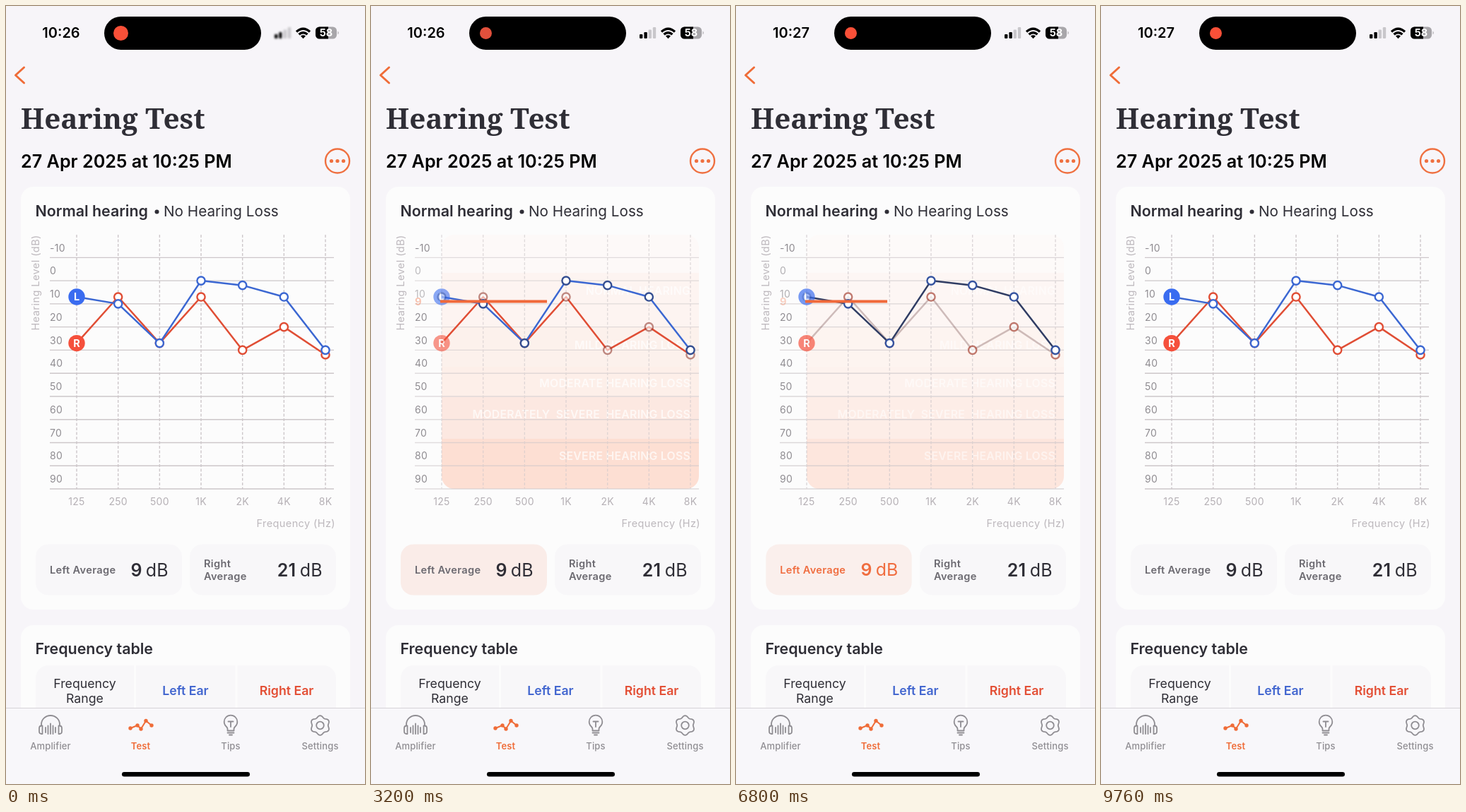
Recreate the animation shown at these times as an HTML page. Size 508 by 1102 pixels, loop 9840 ms.

```html
<!DOCTYPE html>
<html lang="en">
<head>
<meta charset="utf-8">
<title>Hearing Test</title>
<style>
html, body { margin: 0; width: 100%; height: 100%; overflow: hidden; background: #f7f5f9; }
svg { display: block; width: 100%; height: 100%; }
text { font-family: Inter, "Noto Sans", sans-serif; white-space: pre; }
.b { font-weight: 600; }
.m { text-anchor: middle; }
.e { text-anchor: end; }
.axis { font-size: 14px; letter-spacing: .3px; fill: #8f8c91; }
.soft { fill: #bdb8bd; }
.name { font-size: 14.6px; font-weight: 600; letter-spacing: .35px; }
.val { font-size: 25px; }
.tab { font-size: 13px; font-weight: 500; letter-spacing: .15px; fill: #8f8d92; text-anchor: middle; }
.icon { fill: none; stroke: #8f8d92; stroke-width: 1.8; stroke-linecap: round; stroke-linejoin: round; }
</style>
</head>
<body>
<svg id="stage" viewBox="0 0 508 1102">
  <defs>
    <clipPath id="plot"><rect x="100" y="324" width="364" height="360" rx="18"/></clipPath>
    <filter id="haze" x="-30%" y="-30%" width="160%" height="160%"><feGaussianBlur id="blur" stdDeviation="0"/></filter>
  </defs>
  <rect width="508" height="1102" fill="#f7f5f9"/>

  <text id="clock" class="b m" x="78" y="45" font-size="20">10:26</text>
  <rect x="139" y="15" width="222" height="47" rx="23.5"/>
  <circle id="rec" cx="162.5" cy="38.5" r="8.5"/>
  <g id="signal">
    <rect x="380" y="40" width="4.4" height="6" rx="1.2"/>
    <rect x="386.4" y="37" width="4.4" height="9" rx="1.2"/>
    <rect x="392.6" y="33.5" width="4.4" height="12.5" rx="1.2" fill="#c9c7cb"/>
    <rect x="398.8" y="30" width="4.4" height="16" rx="1.2" fill="#c9c7cb"/>
  </g>
  <g fill="none" stroke="#000" stroke-width="3.4">
    <path d="M411 36.5Q420.500 28 430 36.500"/>
    <path d="M414.500 40.300Q420.500 35 426.500 40.300"/>
  </g>
  <path d="M420.500 46.200L417 42.600Q420.500 40 424 42.600Z"/>
  <rect x="438" y="29.500" width="30" height="17" rx="5.500" fill="#a8a6aa"/>
  <path d="M456 29.500H443.500A5.500 5.500 0 0 0 438 35V41A5.500 5.500 0 0 0 443.500 46.500H456Z"/>
  <path d="M469.500 35.500Q472 38 469.500 40.500Z" fill="#a8a6aa"/>
  <text class="m" x="453" y="43.200" font-size="14.500" font-weight="700" fill="#fff">58</text>

  <path d="M25.500 87L13.500 98L25.500 109" fill="none" stroke="#ef6c38" stroke-width="3" stroke-linecap="round" stroke-linejoin="round"/>
  <text x="21" y="173.500" style="font-family:'Noto Serif',serif" font-size="40.500" font-weight="600" fill="#2f2e36">Hearing Test</text>
  <text class="b" x="21" y="228.500" font-size="25.200">27 Apr 2025 at 10:25 PM</text>
  <circle cx="469" cy="219.500" r="17" fill="none" stroke="#ef7040" stroke-width="2.400"/>
  <g fill="#ef7040"><circle cx="460.500" cy="219.500" r="2.600"/><circle cx="469" cy="219.500" r="2.600"/><circle cx="477.500" cy="219.500" r="2.600"/></g>

  <rect x="21" y="256" width="466" height="599" rx="18" fill="#fcfcfc"/>
  <g fill="#2f2e36">
    <text class="b" x="41.500" y="297.500" font-size="21.400">Normal hearing</text>
    <circle cx="213.500" cy="291.500" r="3"/>
    <text x="223" y="297.500" font-size="20.700">No Hearing Loss</text>
  </g>
  <g id="bands" clip-path="url(#plot)"></g>
  <g id="bandText"></g>
  <g id="grid" stroke="#cdc7ca" stroke-width="1.400"></g>
  <g id="labels"></g>
  <text class="soft" transform="translate(47 459.500) rotate(-90)" font-size="14.500" letter-spacing=".45">Hearing Level (dB)</text>
  <text class="soft e" x="466" y="738" font-size="14.500" letter-spacing=".4">Frequency (Hz)</text>
  <g id="series"></g>
  <g id="averages"></g>
  <g id="buttons"></g>

  <rect x="21" y="877" width="466" height="160" rx="18" fill="#fcfcfc"/>
  <text class="b" x="41.500" y="918" font-size="21.400" fill="#2f2e36">Frequency table</text>
  <rect x="42" y="934" width="425" height="100" rx="18" fill="#f8f7f9"/>
  <path d="M182.500 934V1000M326 934V1000" stroke="#fcfcfc" stroke-width="3"/>
  <g class="m" font-size="17.700">
    <text x="111.500" y="966" fill="#2f2e36">Frequency</text>
    <text x="111.500" y="987" fill="#2f2e36">Range</text>
    <text class="b" x="254" y="976" fill="#4165cf">Left Ear</text>
    <text class="b" x="397" y="976" fill="#e34e34">Right Ear</text>
  </g>

  <rect y="994" width="508" height="108" fill="#f8f7fa"/>
  <path d="M0 994.500H508" stroke="#d6d3d8" stroke-width="1.200"/>
  <g class="icon">
    <path d="M50 1019V1017.500A13 12.500 0 0 1 76 1017.500V1019M51.500 1019.500V1031H50.500Q47 1031 47 1027.500V1023Q47 1019.500 50.500 1019.500ZM74.500 1019.500V1031H75.500Q79 1031 79 1027.500V1023Q79 1019.500 75.500 1019.500Z"/>
    <path d="M56 1022V1029M59.500 1019.500V1031M63 1016.500V1031M66.500 1019.500V1031M70 1022V1029"/>
    <path d="M313.500 1026.500V1024Q313.500 1022.500 312 1021A9.300 9.300 0 1 1 324 1021Q322.500 1022.500 322.500 1024V1026.500ZM313.500 1029.500H322.500M316 1032.500H320M314.500 1013.500H321.500M318 1013.500V1021"/>
    <path id="gear"/><circle cx="444.500" cy="1019" r="5.300"/>
  </g>
  <g id="testIcon" fill="#ef6c38"></g>
  <text class="tab" x="63" y="1053">Amplifier</text>
  <text class="tab" x="190.500" y="1053" style="fill:#ef6c38;font-weight:600">Test</text>
  <text class="tab" x="318" y="1053">Tips</text>
  <text class="tab" x="444.500" y="1053">Settings</text>
  <rect x="164" y="1085" width="181" height="6.500" rx="3.250"/>
</svg>
<script>
const LOOP = 9840, FADE = 350, ORANGE = '#f0693a';
const DARK = [43, 42, 51];
const $ = id => document.getElementById(id);
const clamp = x => Math.max(0, Math.min(1, x));
const lerp = (a, b, u) => a + (b - a) * u;
const mix = (a, b, u) => `rgb(${a.map((c, i) => Math.round(lerp(c, b[i], u)))})`;
const levelY = v => 389.1 + 3.277 * v;
const freqX = i => 100 + 58.67 * i;

function add(parent, tag, attrs, text) {
  const el = document.createElementNS('http://www.w3.org/2000/svg', tag);
  set(el, attrs);
  if (text !== undefined) el.textContent = text;
  return parent.appendChild(el);
}
function set(el, attrs) {
  for (const k in attrs) el.setAttribute(k, attrs[k]);
}

const ears = {
  R: { color: [224, 78, 53], badgeFill: '#f5503c', data: [27, 7, 27, 7, 30, 20, 32], avg: 21, hides: [20, 30], x: 260, name: ['Right', 'Average'] },
  L: { color: [59, 103, 210], badgeFill: '#3a6cf0', data: [7, 10, 27, 0, 2, 7, 30], avg: 9, hides: [0, 10], x: 42, name: ['Left Average'] }
};

// Each tap toggles one ear.
const taps = [[1435, 'L'], [3005, 'L'], [4250, 'R'], [5585, 'R'], [6670, 'L'], [8110, 'R'], [9410, 'R']];

const edges = [324, 378, 455, 511, 554, 613, 684];
['#fef6f2', '#fee9e2', '#fde2d6', '#fedcce', '#fdccba', '#feb799'].forEach((fill, i) =>
  add($('bands'), 'rect', { x: 100, y: edges[i], width: 364, height: edges[i + 1] - edges[i], fill }));
[['NORMAL HEARING', 403], ['MILD HEARING LOSS', 480.5], ['MODERATE HEARING LOSS', 534],
 ['MODERATELY\u00a0 SEVERE\u00a0 HEARING LOSS', 578.5], ['SEVERE HEARING LOSS', 637]].forEach(([s, y]) =>
  add($('bandText'), 'text', { class: 'b e', x: 452, y: y + 5.7, fill: '#fff', 'font-size': 15.8, 'letter-spacing': .25 }, s));

const labels = {};
for (let v = -10; v <= 90; v += 10) {
  const y = levelY(v);
  add($('grid'), 'path', { d: `M62 ${y}H464` });
  labels[v] = add($('labels'), 'text', { class: 'axis', x: 62, y: y - 8.8 }, v);
}
['125', '250', '500', '1K', '2K', '4K', '8K'].forEach((s, i) => {
  add($('grid'), 'path', { d: `M${freqX(i)} 324V684`, 'stroke-dasharray': '4 2.5' });
  add($('labels'), 'text', { class: 'axis soft m', style: 'fill:#b5b0b5', x: freqX(i), y: 706.5 }, s);
});

for (const key in ears) {
  const ear = ears[key], g = $('series'), avgY = levelY(ear.avg);
  const pts = ear.data.map((v, i) => [freqX(i), levelY(v)]);
  ear.line = add(g, 'polyline', { points: pts.join(' '), fill: 'none', 'stroke-width': 2.5, 'stroke-linejoin': 'round' });
  ear.badge = add(g, 'g', {});
  add(ear.badge, 'circle', { cx: 100, cy: pts[0][1], r: 11.7, fill: ear.badgeFill });
  add(ear.badge, 'text', { class: 'm', x: 100, y: pts[0][1] + 5.2, 'font-size': 14.5, 'font-weight': 700, fill: '#fff' }, key);
  ear.dots = pts.map(([cx, cy]) => add(g, 'circle', { cx, cy, r: 5.6, fill: '#fff', 'stroke-width': 2.4 }));

  ear.rule = add($('averages'), 'path', { stroke: ORANGE, 'stroke-width': 4 });
  ear.ruleLabel = add($('averages'), 'text', { class: 'b', x: 62, y: avgY + 5.3, 'font-size': 15, fill: ORANGE }, ear.avg);

  const x = ear.x;
  ear.button = add($('buttons'), 'g', {});
  ear.plate = add(ear.button, 'rect', { x, y: 762.5, width: 207, height: 72, rx: 18 });
  ear.caption = add(ear.button, 'g', {});
  const two = ear.name.length > 1;
  ear.name.forEach((s, i) =>
    add(ear.caption, 'text', { class: 'name', x: x + 20, y: (two ? 795 : 804) + 18 * i }, s));
  ear.value = add(ear.button, 'g', {});
  add(ear.value, 'text', { class: 'val b e', x: x + (two ? 150 : 150.5), y: 807.5 }, ear.avg);
  add(ear.value, 'text', { class: 'val e', x: x + 187.5, y: 807.5 }, 'dB');
}

let gear = '';
for (let i = 0; i < 72; i++) {
  const a = i * Math.PI / 36, r = 12.6 + 1.3 * Math.cos(6 * a + Math.PI);
  gear += `${i ? 'L' : 'M'}${(444.5 + r * Math.cos(a)).toFixed(2)} ${(1019 + r * Math.sin(a)).toFixed(2)}`;
}
$('gear').setAttribute('d', gear + 'Z');

const trend = [[176, 1023], [186, 1019], [191, 1024], [198, 1012.5], [206, 1019]];
add($('testIcon'), 'polyline', { points: trend.join(' '), fill: 'none', stroke: '#ef6c38', 'stroke-width': 2 });
trend.forEach(([cx, cy]) => add($('testIcon'), 'circle', { cx, cy, r: 2.7 }));

function selection(t) {
  let from = '', to = '', start = -FADE;
  for (const [time, ear] of taps) {
    if (t < time) break;
    from = to;
    to = to === ear ? '' : ear;
    start = time;
  }
  const k = clamp((t - start) / FADE);
  return { from, to, u: k * k * (3 - 2 * k) };
}

function pressOf(key, t) {
  return taps.reduce((p, [time, ear]) => {
    if (ear !== key) return p;
    const d = t - time;
    return Math.max(p, d < 0 ? clamp(1 + d / 50) : clamp(1 - d / 150));
  }, 0);
}

function render(t) {
  const { from, to, u } = selection(t);
  const fast = clamp(u * 2.2);
  const blend = (f, k) => lerp(f(from), f(to), k);
  const picked = blend(s => s ? 1 : 0, u);

  $('clock').textContent = t < 6720 ? '10:26' : '10:27';
  const settle = clamp(1 - t / 400);
  const dim = Math.max(0, Math.cos((t - 3200) / 4880 * 2 * Math.PI)) ** 2;
  set($('rec'), { r: 8.5 + 2 * settle, fill: mix([250, 80, 56], [226, 80, 60], dim) });
  if (settle > 0) $('signal').setAttribute('filter', 'url(#haze)');
  else $('signal').removeAttribute('filter');
  $('blur').setAttribute('stdDeviation', 1.6 * settle);

  set($('bands'), { opacity: picked });
  set($('bandText'), { opacity: .85 * clamp(picked * 2) });
  set($('grid'), { opacity: 1 - picked });

  for (const key in ears) {
    const ear = ears[key];
    const on = blend(s => s === key ? 1 : 0, u);
    const shown = s => !s || s === key ? 1 : 0;
    const dark = s => s ? 1 : 0;
    set(ear.line, { stroke: mix(ear.color, DARK, blend(dark, fast)), opacity: blend(shown, fast) });
    set(ear.badge, { opacity: 1 - picked });
    ear.dots.forEach((dot, i) => set(dot, {
      stroke: mix(ear.color, DARK, blend(dark, u)),
      opacity: i ? blend(shown, u) : on
    }));

    set(ear.rule, { d: `M98 ${levelY(ear.avg)}h${368 * on}`, opacity: on > 0 ? 1 : 0 });
    set(ear.ruleLabel, { opacity: on });
    ear.hides.forEach(v => set(labels[v], { opacity: 1 - on }));

    const press = pressOf(key, t), scale = 1 - .024 * press;
    const cx = ear.x + 103.5, cy = 798.5;
    set(ear.button, { transform: `translate(${cx} ${cy}) scale(${scale}) translate(${-cx} ${-cy})` });
    set(ear.plate, { fill: mix([248, 247, 249], [254, 221, 207], on) });
    const fade = 1 - .25 * press;
    set(ear.caption, { fill: to === key ? ORANGE : '#6b6970', opacity: fade });
    set(ear.value, { fill: to === key ? ORANGE : '#2f2e36', opacity: fade });
  }
}

function tick() {
  render(performance.now() % LOOP);
  requestAnimationFrame(tick);
}
tick();
</script>
</body>
</html>
```
